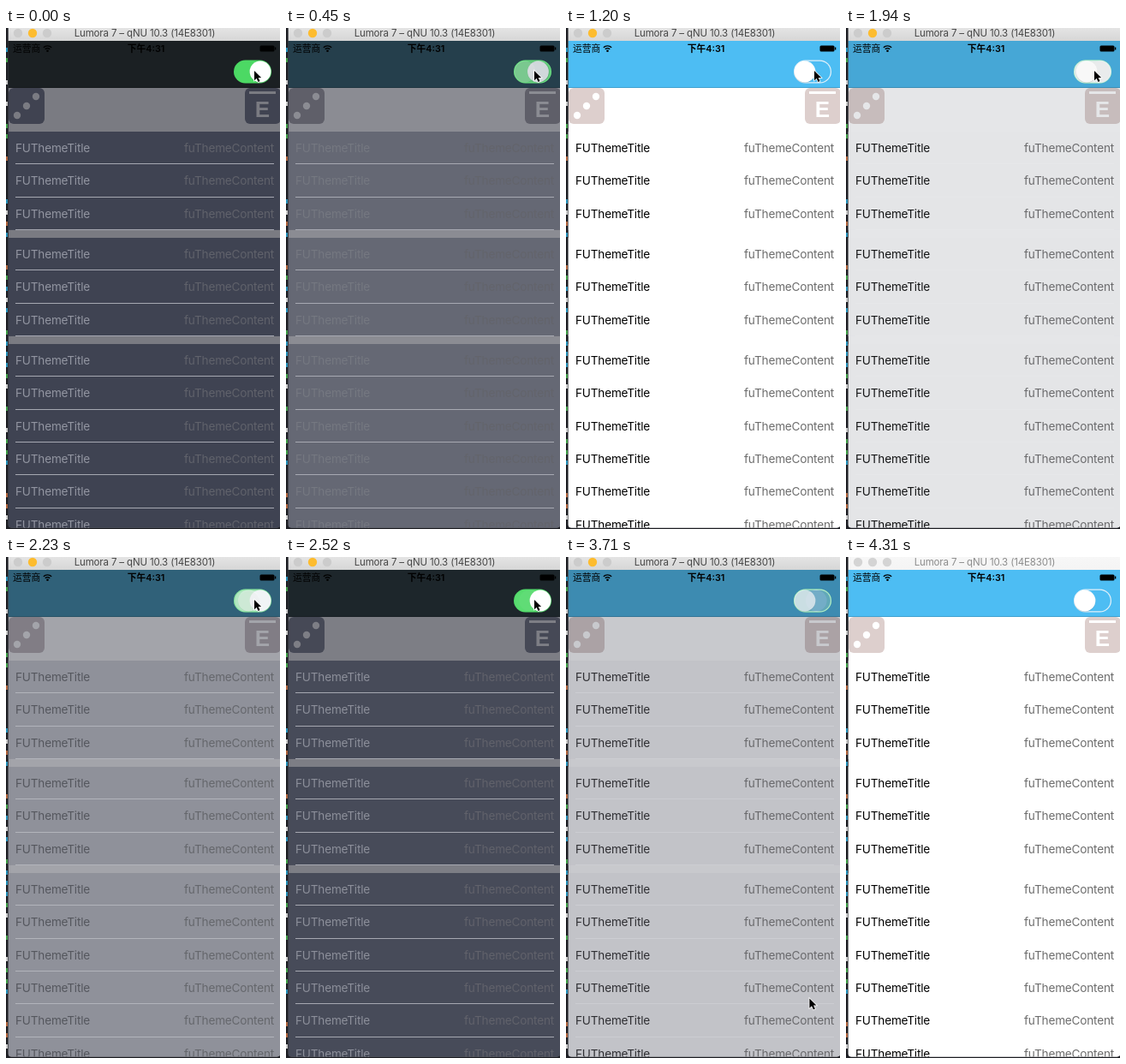
An HTML page with a canvas that plays this animation: 320 by 585 pixels, repeating every 4.38 s.

```html
<!DOCTYPE html>
<html lang="zh">
<head>
<meta charset="utf-8">
<style>
html, body { margin: 0; width: 100%; height: 100%; overflow: hidden; background: #1d1e23; }
canvas { display: block; width: 320px; height: 585px; }
</style>
</head>
<body>
<canvas id="stage" width="320" height="585"></canvas>
<script>
const ctx = document.getElementById('stage').getContext('2d');
const LOOP = 4380, FADE = 900;
const TO_DAY = 195, TO_NIGHT = 1730, TO_DAY_AGAIN = 3150, POINTER_LEAVES = 2848, WINDOW_IDLE = 4010;
const SANS = 'Inter, "Noto Sans CJK SC", "Noto Sans CJK", sans-serif';
const GREEN = '#4cd964', PALE = '#ebebeb';
const PITCH = 38.3, LEFT = 2.5, WIDTH = 318;
const KNOB_OFF = 279, KNOB_ON = 297;

// Night and day colour of each themed part
const THEME = {
  nav: ['1b2023', '4dbdf3'],
  cell: ['3f4352', 'ffffff'],
  gap: ['7a7b82', 'ffffff'],
  line: ['a6a8b2', 'ffffff'],
  title: ['9295a1', '000000'],
  note: ['60626b', '6d6d6d'],
  icon: ['404351', 'ddcfcd']
};

const lerp = (a, b, k) => a + (b - a) * k;
const blend = (a, b, k) => a.map((v, i) => lerp(v, b[i], k));
const channels = hex => hex.match(/../g).map(v => parseInt(v, 16));

function ease(t, start) {
  const u = Math.min(1, Math.max(0, (t - start) / FADE));
  return u * u * (3 - 2 * u);
}

const daylight = t => ease(t, TO_DAY) - ease(t, TO_NIGHT) + ease(t, TO_DAY_AGAIN);

function palette(p) {
  const c = {};
  for (const part in THEME) c[part] = blend(...THEME[part].map(channels), p);
  // Gaps and lines sink into the cells as the day comes
  for (const part of ['gap', 'line']) c[part] = blend(c[part], c.cell, p);
  for (const part in c) c[part] = `rgb(${c[part].map(Math.round)})`;
  return c;
}

function rect(x, y, w, h, color) {
  ctx.fillStyle = color;
  ctx.fillRect(x, y, w, h);
}

function pill(x, y, w, h, r, color) {
  ctx.fillStyle = color;
  ctx.beginPath();
  ctx.roundRect(x, y, w, h, r);
  ctx.fill();
}

function disc(x, y, r, color) {
  ctx.fillStyle = color;
  ctx.beginPath();
  ctx.arc(x, y, r, 0, 7);
  ctx.fill();
}

function text(str, x, y, font, color, align = 'left', spacing = 0) {
  ctx.font = `${font}, ${SANS}`;
  ctx.letterSpacing = spacing + 'px';
  ctx.textAlign = align;
  ctx.fillStyle = color;
  ctx.fillText(str, x, y);
}

// Ends of code lines peeking out at the left
function codeEdge() {
  const inks = ['#b0643c', '#258fb8', '#3f9c46', '#cccccc'];
  let seed = 7;
  const random = () => (seed = seed * 16807 % 2147483647) / 2147483647;
  for (let y = 10; y < 580; y += 12.7) {
    const ink = inks[Math.floor(random() * inks.length)];
    if (random() < 0.55) rect(0, Math.round(y), 2, 5, ink);
  }
}

function titleBar(idle) {
  const shade = ctx.createLinearGradient(0, 0, 0, 15);
  shade.addColorStop(0, idle ? '#f7f7f7' : '#e4e4e4');
  shade.addColorStop(1, idle ? '#f4f4f4' : '#d6d6d6');
  rect(LEFT, 0, WIDTH, 15, shade);
  const grey = idle ? '#d4d4d4' : '#cccccc';
  for (let i = 0; i < 3; i++) disc(14 + 17 * i, 6, 5.2, i === 1 && !idle ? '#fdbc2f' : grey);
  text('Lumora 7 – qNU 10.3 (14E8301)', 162, 10.3, '11.5px Inter', idle ? '#8c8c8c' : '#464646', 'center', -0.15);
}

function statusBar() {
  text('运营商', 8, 28, '10.8px Inter', '#000');
  text('下午4:31', 163.5, 28, '600 10.8px Inter', '#000', 'center');
  ctx.strokeStyle = '#000';
  ctx.lineWidth = 1.4;
  for (const r of [3.8, 6.6]) {
    ctx.beginPath();
    ctx.arc(48.5, 27.5, r, -2.36, -0.78);
    ctx.stroke();
  }
  disc(48.5, 26.8, 1.3, '#000');
  pill(296.5, 20.5, 17, 7, 1.5, '#000');
  rect(314, 22.5, 1.3, 3, '#000');
}

function switchLayer(knob, rim, fill, alpha) {
  ctx.globalAlpha = alpha;
  pill(266, 37.5, 44, 27, 13.5, rim);
  pill(267.2, 38.7, 41.6, 24.6, 12.3, fill);
  disc(knob, 51.8, 12.4, 'rgba(0,0,0,.14)');
  disc(knob, 51, 12.4, '#fff');
  ctx.globalAlpha = 1;
}

// The two states cross-fade; the leaving knob slides a little towards the other
function toggle(t, p, nav) {
  const turningOn = t > TO_NIGHT && t < TO_DAY_AGAIN;
  const slide = 0.32 * Math.sqrt(turningOn ? 1 - p : p);
  const on = turningOn ? KNOB_ON : lerp(KNOB_ON, KNOB_OFF, slide);
  const off = turningOn ? lerp(KNOB_OFF, KNOB_ON, slide) : KNOB_OFF;
  if (p < 1) switchLayer(on, GREEN, GREEN, 1);
  switchLayer(off, '#e2f1f9', turningOn ? PALE : nav, p);
}

function icons(c) {
  pill(3, 70, 42, 42, 6, c.icon);
  for (const d of [-11, 0, 11]) disc(24 + d, 91 - d, 4.2, c.gap);
  pill(279, 70, 42, 42, 6, c.icon);
  rect(284, 74, 31, 3, c.gap);
  text('E', 299.5, 104, 'bold 26px "Liberation Sans"', c.gap, 'center');
}

function section(top, rows, c) {
  rect(LEFT, top, WIDTH, rows * PITCH, c.cell);
  for (let i = 0; i < rows; i++) {
    const y = top + i * PITCH;
    text('FUThemeTitle', 11, y + 24, '13.6px Inter', c.title, 'left', -0.2);
    text('fuThemeContent', 313, y + 24, '13.6px Inter', c.note, 'right', -0.2);
    rect(11, Math.round(y + PITCH - 1), 302, 1, c.line);
  }
}

function pointer(t) {
  const run = Math.max(0, t - POINTER_LEAVES);
  const arrow = new Path2D('M0 0V12L2.8 9.4L4.9 14L7 13L5 8.6H8.7Z');
  ctx.save();
  ctx.translate(290 - 9 * Math.sin(run / 350), 50 + (run / 40) ** 2);
  ctx.scale(0.93, 0.93);
  ctx.lineWidth = 1.6;
  ctx.strokeStyle = '#fff';
  ctx.stroke(arrow);
  ctx.fillStyle = '#000';
  ctx.fill(arrow);
  ctx.restore();
}

function draw(t) {
  const p = daylight(t), c = palette(p);
  rect(0, 0, 320, 585, '#1d1e23');
  codeEdge();
  ctx.save();
  ctx.beginPath();
  ctx.roundRect(LEFT, -6, WIDTH, 589.5, 4);
  ctx.clip();
  rect(LEFT, 0, WIDTH, 585, c.gap);
  [3, 3, 6].forEach((rows, i) => section(121 + 124 * i, rows, c));
  icons(c);
  rect(LEFT, 15, WIDTH, 55, c.nav);
  rect(LEFT, 69, WIDTH, 1, 'rgba(0,0,0,.15)');
  titleBar(t >= WINDOW_IDLE);
  statusBar();
  toggle(t, p, c.nav);
  ctx.restore();
  pointer(t);
}

const start = performance.now();
function tick() {
  draw((performance.now() - start) % LOOP);
  requestAnimationFrame(tick);
}
tick();
</script>
</body>
</html>
```
